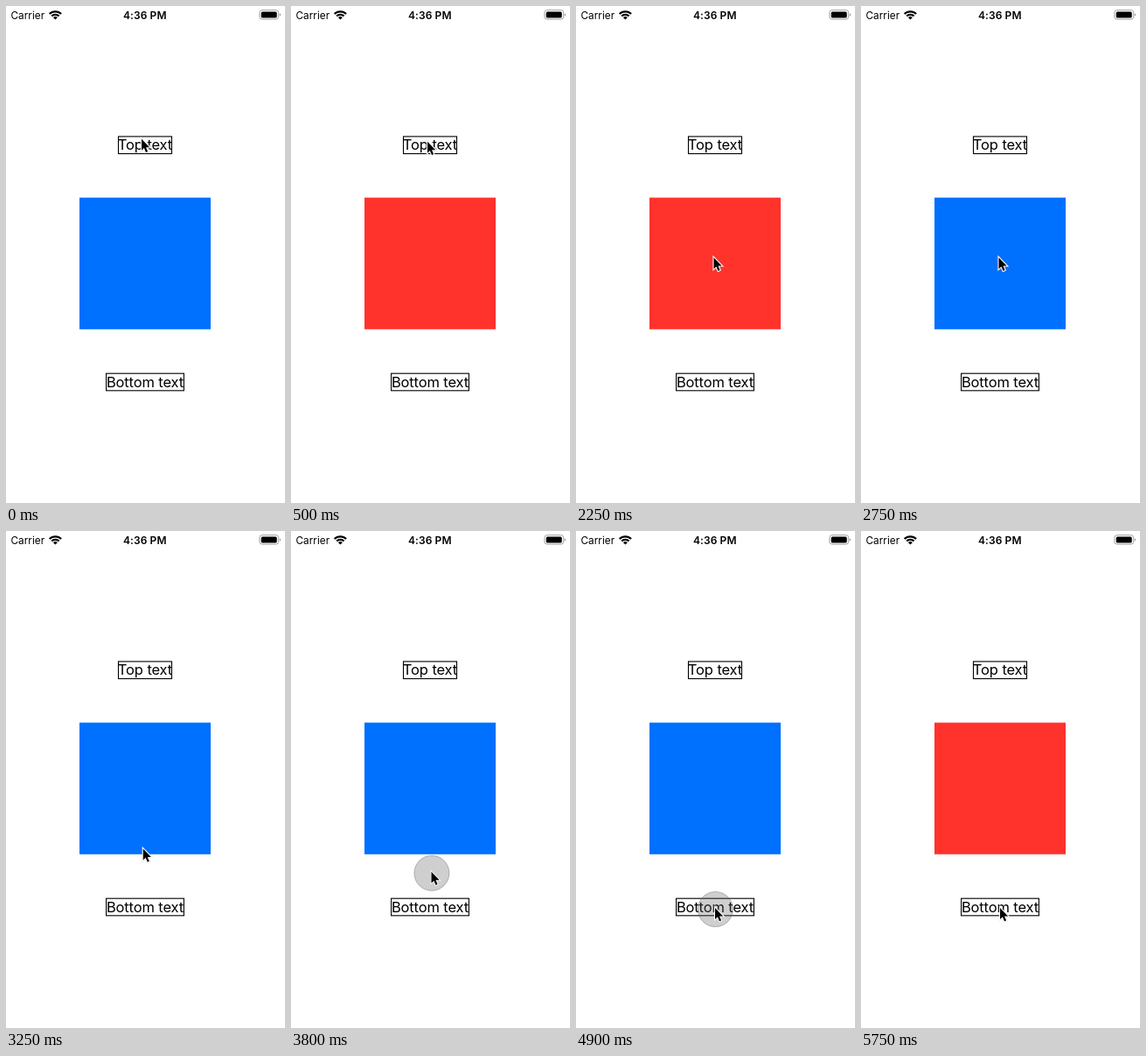
Animation, 319 px wide and 567 px high, one loop 6.05 s. Source, as an HTML page:

```html
<!DOCTYPE html>
<html lang="en">
<head>
<meta charset="utf-8">
<title>Tap areas</title>
<style>
  html, body { margin: 0; width: 100%; height: 100%; overflow: hidden; background: #fff; }
  svg { display: block; width: 319px; height: 567px; font-family: Inter, Roboto, sans-serif; }
  .label { font-size: 16.5px; letter-spacing: -.12px; text-anchor: middle; }
  .frame { fill: none; stroke: #000; stroke-width: 1.1; }
</style>
</head>
<body>
<svg viewBox="0 0 319 567">
  <text x="5.5" y="14.5" font-size="11.8">Carrier</text>
  <g transform="translate(56.4 15.6)" fill="none" stroke="#000" stroke-width="2.2">
    <path d="M-6.7 -6.5A9.4 9.4 0 0 1 6.7 -6.5"/>
    <path d="M-4.2 -4A5.9 5.9 0 0 1 4.2 -4"/>
    <path d="M0 0L-2.4 -2.4A3.4 3.4 0 0 1 2.4 -2.4Z" fill="#000" stroke="none"/>
  </g>
  <text x="158.8" y="14.5" font-size="12" font-weight="600" letter-spacing=".1" text-anchor="middle">4:36 PM</text>
  <rect x="289.9" y="4.7" width="21.8" height="10.4" rx="2.9" fill="none" stroke="#a0a0a0"/>
  <rect x="291.7" y="6.5" width="18" height="7" rx="1.5"/>
  <path d="M312.8 8.2Q314.2 8.7 314.2 10T312.8 11.8Z" fill="#a0a0a0"/>

  <rect class="frame" x="128.5" y="148.9" width="61" height="19.6"/>
  <text class="label" x="159" y="164.4">Top text</text>
  <rect id="square" x="84" y="218.6" width="150" height="150.2"/>
  <rect class="frame" x="114.6" y="419.2" width="88.8" height="19.6"/>
  <text class="label" x="159" y="434.7">Bottom text</text>

  <circle id="touch" r="20" fill="rgba(96,96,96,.3)" stroke="rgba(90,90,90,.4)"/>
  <path id="cursor" d="M0 0V13L2.9 10.3L5 15.2L7.1 14.3L5 9.5H9.2Z"
        stroke="#fff" stroke-width="2.2" paint-order="stroke"
        style="filter: drop-shadow(0 .7px .6px rgba(0,0,0,.35))"/>
</svg>
<script>
const LOOP = 6050, STEP = 50;
const COLOURS = ['#0070ff', '#ff322c'];
const HOME = [155, 151.7];

// Pointer moves: start, end, x, y
const moves = [
  [0, 200, 156, 154.7],
  [650, 1250, 156.3, 188.2],
  [1300, 1500, 157, 190.2],
  [1750, 1800, 156.5, 206.7],
  [1950, 2250, 157.5, 287],
  [2950, 3400, 160.5, 388.8],
  [4100, 4150, 160.5, 401.5],
  [4250, 4450, 159, 430]
];
// Taps: press, release, whether the square toggles
const taps = [
  [50, 500, 1], [1650, 1750, 0], [2650, 2750, 1], [3600, 3900, 0], [4750, 5000, 1]
];

const [square, touch, cursor] = ['square', 'touch', 'cursor'].map(id => document.getElementById(id));

const ease = k => k * k * (3 - 2 * k);

// Each move eases to its goal and bows to the left in proportion to its length.
function pointAt(t) {
  let [x, y] = HOME;
  for (const [from, to, goalX, goalY] of moves) {
    if (t <= from) break;
    const k = ease(Math.min(1, (t - from) / (to - from)));
    const bow = (goalY - y) * .04 * Math.sin(Math.PI * k);
    x += (goalX - x) * k - bow;
    y += (goalY - y) * k;
  }
  return [x, y];
}

function draw(ms) {
  const t = Math.floor(ms % LOOP / STEP) * STEP;
  const [x, y] = pointAt(t);
  const toggles = taps.filter(([, off, hit]) => hit && t >= off).length;
  cursor.setAttribute('transform', `translate(${x} ${y})`);
  touch.setAttribute('transform', `translate(${x + .4} ${y + 1.5})`);
  touch.style.display = taps.some(([on, off]) => t >= on && t < off) ? '' : 'none';
  square.setAttribute('fill', COLOURS[toggles % 2]);
}

const start = performance.now();
function tick() {
  draw(performance.now() - start);
  requestAnimationFrame(tick);
}
tick();
</script>
</body>
</html>
```
